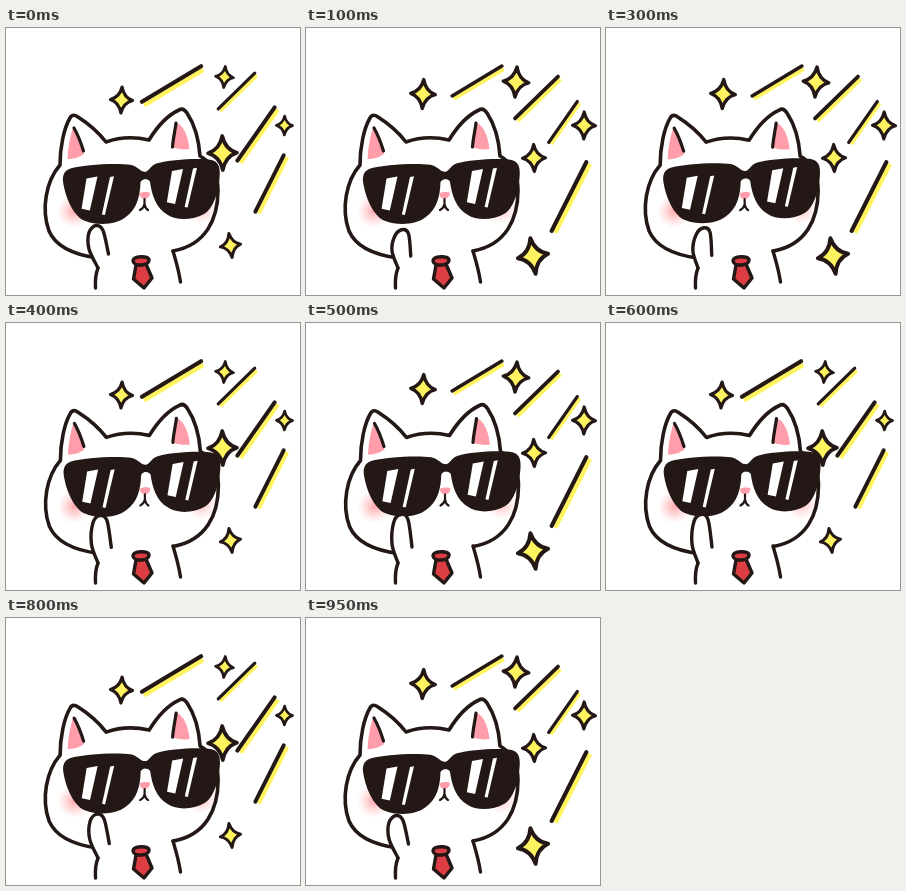
An HTML page with a canvas that plays this animation: 294 by 267 pixels, repeating every 1000 ms.

```html
<!DOCTYPE html>
<html>
<head>
<meta charset="utf-8">
<style>
html, body { margin: 0; width: 100%; height: 100%; overflow: hidden; background: #fff; }
canvas { display: block; width: 294px; height: 267px; }
</style>
</head>
<body>
<canvas id="stage" width="294" height="267"></canvas>
<script>
const ctx = document.getElementById('stage').getContext('2d');
const INK = '#231815', PINK = '#ff9daa', YELLOW = '#fff45f', RED = '#dc3e43';
const LOOP = 1000, STEP = 50, BLINK = 100;

// Two alternating layouts. Stars: x, y, radius. Rays: centre x, y, length.
const SPARKLES = [
  {
    stars: [[115.5, 72, 13], [218.5, 49, 10.5], [216.5, 125, 17], [278.5, 97.5, 9.5], [224.5, 217.5, 12]],
    rays: [[165.5, 56, 69], [230.5, 63, 51], [250, 106, 65], [263.5, 155.5, 63]]
  },
  {
    stars: [[117, 66, 14.5], [210, 54, 15], [278, 97.5, 13.5], [228, 130, 13.5], [227, 228, 18]],
    rays: [[171, 53, 58], [230.5, 69.5, 60], [257, 94, 50], [263, 168.5, 77]]
  }
];

function paint(path, fill, width) {
  if (fill) { ctx.fillStyle = fill; ctx.fill(path); }
  if (width) { ctx.strokeStyle = INK; ctx.lineWidth = width; ctx.stroke(path); }
}

const draw = (d, fill, width) => paint(new Path2D(d), fill, width);

function place(x, y, angle, paintPart) {
  ctx.save();
  ctx.translate(x, y);
  ctx.rotate(angle);
  paintPart();
  ctx.restore();
}

function smooth(from, to, t) {
  const u = Math.min(1, Math.max(0, (t - from) / (to - from)));
  return u * u * (3 - 2 * u);
}

function spline(pts) {
  const path = new Path2D();
  path.moveTo(...pts[0]);
  for (let i = 0; i < pts.length - 1; i++) {
    const a = pts[i], b = pts[i + 1];
    const p = pts[i - 1] || a, n = pts[i + 2] || b;
    path.bezierCurveTo(
      a[0] + (b[0] - p[0]) / 6, a[1] + (b[1] - p[1]) / 6,
      b[0] - (n[0] - a[0]) / 6, b[1] - (n[1] - a[1]) / 6, b[0], b[1]);
  }
  return path;
}

function star([x, y, r]) {
  const w = r * .85, c = .2;
  place(x, y, (110 - y) / 800, () => {
    const path = new Path2D();
    path.moveTo(0, -r);
    for (const [sx, sy] of [[1, -1], [1, 1], [-1, 1], [-1, -1]]) {
      const end = sx === sy ? [0, sy * r] : [sx * w, 0];
      path.quadraticCurveTo(sx * w * c, sy * r * c, ...end);
    }
    path.closePath();
    paint(path, YELLOW, 1.2 + r * .15);
  });
}

// Rays fan out, each steeper than the one before.
function ray([x, y, len], i) {
  const angle = -(31 + 14.5 * i - 1.25 * i * i) * Math.PI / 180;
  const w = Math.min(4.2, len / 16);
  place(x, y, angle, () => {
    ctx.fillStyle = YELLOW;
    ctx.fillRect(-len / 2, 0, len, w * 1.5);
    draw(`M${-len / 2} 0H${len / 2}`, null, w);
  });
}

function blush(x, y, r, alpha) {
  const g = ctx.createRadialGradient(x, y, 0, x, y, r);
  g.addColorStop(0, `rgba(255,150,155,${alpha})`);
  g.addColorStop(1, 'rgba(255,190,190,0)');
  ctx.fillStyle = g;
  ctx.fillRect(x - r, y - r, r * 2, r * 2);
}

function head(lift) {
  place(lift * .5, lift * .5, 0, () => {
    blush(68, 183, 17, .85);
    blush(195, 180, 16, .7);
    draw('M67 100C64 108 62 121 61.5 131C68 131 74 129 78 126Z', PINK);
    draw('M170 95C177 96 182 108 183.5 121C178 122 171 121 166 119Z', PINK);
    draw('M68 100C72 107 75 115 77.5 123M170 95C169 103 167 111 166.5 119', null, 3.2);
    draw('M92 230C69 227 50 219 43 203C35 181 40 153 54 137C54 119 58 100 64 90C66 86 69 87 72 89C83 96 93 105 100 114C114 109 130 109 143 112C151 99 162 87 173 82C176 80 179 82 181 85C189 97 193 114 194 128C205 134 212 146 212 162C212 191 200 217 167 223', null, 3.6);
    draw('M133.5 165.5C136 163.5 142 163.5 144 165C144 168 141 171 138.5 171C136 171 133 168 133.5 165.5Z', PINK);
    draw('M138.5 171V177M134 182C136 181 138 179 138.5 176C139 179 140 181 142 182', null, 2.2);
  });
}

function glare(x, y, w, h) {
  const lean = h * .24;
  draw(`M${x} ${y}L${x + w} ${y - w * .18}L${x + w - lean} ${y + h}L${x - lean + w * .25} ${y + h - w * .15}Z`, '#fff');
}

function glasses(lift) {
  const lens = new Path2D('M1 -3C-5 -3 -6 -9 -14 -11C-28 -14 -62 -14 -74 -11C-81 -9 -83 -4 -82 4C-80 22 -72 38 -63 42C-50 48 -32 48 -22 41C-10 34 -6 20 -5 7C-4 5 -2 4 1 4Z');
  place(lift * .8, lift * -2.6, 0, () => {
    place(139, 147, -.061, () => {
      paint(lens, INK);
      ctx.scale(-.91, 1);
      paint(lens, INK);
    });
    glare(80.5, 150.5, 11, 32);
    glare(104, 149, 4, 38);
    glare(166, 143, 11, 33);
    glare(187, 140.5, 4, 39);
  });
}

function body() {
  draw('M167 223C170 233 173 244 174.5 254', null, 3.4);
  draw('M130 237L140 236L146 250L138 260L127.5 251Z', RED, 3.4);
  draw('M127 233C127 228 143 227 143 232C143 238 128 239 127 233Z', RED, 3.4);
}

function paw(swipe, lift) {
  const x = 90 + 11 * swipe + 5 * lift, y = 197.5 + 8.5 * swipe - 6 * lift;
  const wristX = 102.5 + 4.5 * swipe + 3.5 * lift, wristY = 226 + 4 * swipe - 2 * lift;
  paint(spline([
    [92, 240],
    [83 + 6 * swipe + 3 * lift, 221 + 4 * swipe],
    [x - 7, y + 7],
    [x, y],
    [x + 7, y + 5 - 2 * swipe],
    [wristX, wristY]
  ]), '#fff', 3.4);
  draw('M92 240C90 245 89 252 89.5 260', null, 3.4);
}

function render(t) {
  const swipe = smooth(0, 200, t) - smooth(200, 400, t);
  const lift = smooth(200, 480, t) - smooth(620, 880, t);
  const { stars, rays } = SPARKLES[Math.floor(t / BLINK) % 2];
  ctx.fillStyle = '#fff';
  ctx.fillRect(0, 0, 294, 267);
  ctx.lineCap = ctx.lineJoin = 'round';
  rays.forEach(ray);
  body();
  head(lift);
  glasses(lift);
  paw(swipe, lift);
  stars.forEach(star);
}

function tick() {
  const t = performance.now() % LOOP;
  render(Math.floor(t / STEP) * STEP);
  requestAnimationFrame(tick);
}
tick();
</script>
</body>
</html>
```
